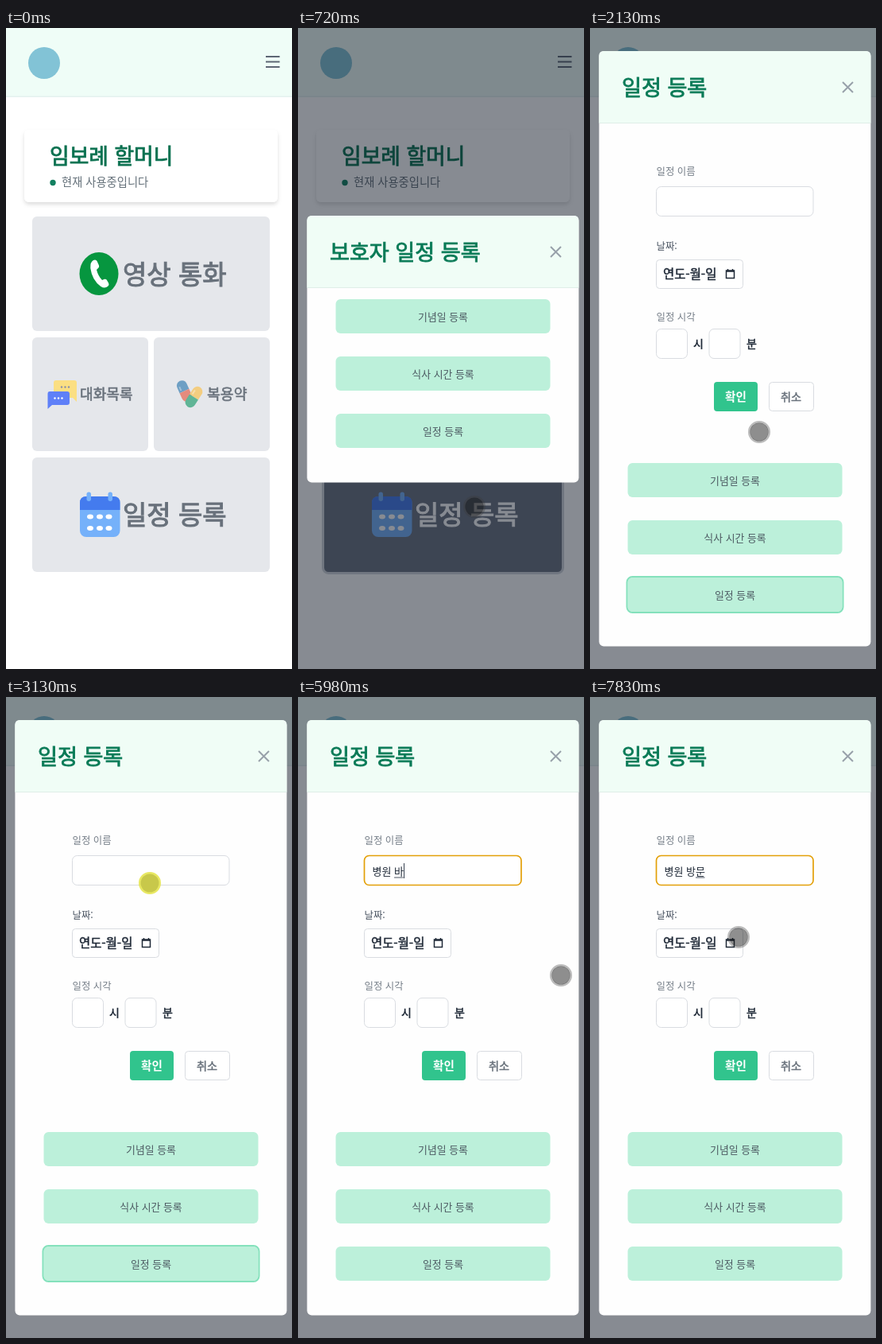
An HTML page that plays this animation: 360 px wide and 806 px high, repeating every 8000 ms.

```html
<!DOCTYPE html>
<html lang="ko">
<head>
<meta charset="utf-8">
<title>일정 등록</title>
<style>
html, body { margin: 0; width: 100%; height: 100%; overflow: hidden; background: #fff; }
svg { display: block; width: 100vw; height: 100vh; }
text { font-family: "Noto Sans CJK KR", "Noto Sans CJK JP", "Noto Sans CJK", sans-serif; white-space: pre; }
</style>
</head>
<body>
<svg id="stage" viewBox="0 0 360 806"></svg>
<script>
const LOOP = 8000;

// x, y, right, bottom
const box = (x, y, r, b, fill, attrs = '', rx = 6) =>
  `<rect x="${x}" y="${y}" width="${r - x}" height="${b - y}" rx="${rx}" fill="${fill}" ${attrs}/>`;
// cy is the middle of the glyphs
const label = (str, x, cy, size, fill, attrs = '') =>
  `<text x="${x}" y="${cy + size * 0.37}" font-size="${size}" fill="${fill}" ${attrs}>${str}</text>`;
// a thin outline gives a weight between regular and bold
const heading = (str, x, cy, size, fill, attrs = '') =>
  label(str, x, cy, size, fill, `stroke="${fill}" stroke-width="${size * 0.032}" ${attrs}`);
const CENTER = 'text-anchor="middle"';
const path = (d, stroke, width) =>
  `<path d="${d}" fill="none" stroke="${stroke}" stroke-width="${width}"/>`;
const dots = (xs, y, rx, ry, fill = '#fff') =>
  xs.map(x => `<ellipse cx="${x}" cy="${y}" rx="${rx}" ry="${ry}" fill="${fill}"/>`).join('');
const field = (x, y, r, b, rx = 6, attrs = '') =>
  box(x + .5, y + .5, r - .5, b - .5, '#fff', `stroke="#d9dce1" ${attrs}`, rx);
const tile = (x, y, r, b) => box(x, y, r, b, '#e5e7eb');

const phone = `<ellipse cx="117" cy="309" rx="24.5" ry="27" fill="#06963f"/>
  <path d="M110 292 q3 -1.5 4.5 1 l2.5 5.5 q.7 2 -1 3.5 l-2 2 q2 8 7 13 l3 -1.2 q1.7 -.5 2.8 1 l2.3 4 q1.2 2.3 -.8 4 q-4 3.5 -9 .2 q-11 -8 -13 -23 q-.4 -8 3.7 -10z" fill="#fff"/>`;
const chat = `<path d="M63 443 H86 q3 0 3 3 V470 l-5 -5 H63 q-3 0 -3 -3 V446 q0 -3 3 -3z" fill="#fbdf82"/>
  ${dots([70, 74.5, 79], 451.5, 1.2, 1.2, '#8a8fa8')}
  <path d="M55 457 H77 q3 0 3 3 V471 q0 3 -3 3 H58 l-5.5 5 V460 q0 -3 2.5 -3z" fill="#5f80f8"/>
  ${dots([61.5, 66, 70.5], 465.5, 1.2, 1.2)}`;
const pill = (x, y, angle, half, top, bottom) =>
  `<g transform="translate(${x} ${y}) rotate(${angle})">
    <path d="M-6.5 0 V${6.5 - half} a6.5 6.5 0 0 1 13 0 V0z" fill="${top}"/>
    <path d="M-6.5 0 V${half - 6.5} a6.5 6.5 0 0 0 13 0 V0z" fill="${bottom}"/>
    <path d="M-3.5 ${6.5 - half} V-2" stroke="#fff" stroke-opacity=".35" stroke-width="2"/></g>`;
const calendar = box(93, 589, 143.5, 640, '#75b1fa', '', 8) +
  '<path d="M93 606 V597 q0 -8 8 -8 H135.5 q8 0 8 8 V606z" fill="#447bee"/>' +
  box(101.5, 583.5, 107, 595, '#75b1fa', '', 2.7) + box(128.5, 583.5, 134, 595, '#75b1fa', '', 2.7) +
  dots([106, 118, 129.5], 614.5, 4, 3) + dots([106, 118, 129.5], 629, 4, 3);

const GRAY = '#68717b', GREEN = '#08704f', INK = '#1f2937';

const home = box(0, 0, 360, 86, '#effdf7', '', 0) + box(0, 85.5, 360, 87, '#e4f1ef', '', 0) +
  '<circle cx="48" cy="44" r="20" fill="#82c3d6"/>' +
  path('M327 36 H344.5 M327 42.5 H344.5 M327 49 H344.5', '#5d6674', 2) +
  box(23, 128, 342, 219, '#fff', 'filter="url(#shadow)"') +
  heading('임보례 할머니', 55, 161, 26.8, GREEN) +
  '<circle cx="59" cy="194.5" r="3.7" fill="#128060"/>' +
  label('현재 사용중입니다', 70, 194, 14.3, '#65717a') +
  tile(33, 237, 332, 381) + phone + heading('영상 통화', 147, 310, 33, GRAY) +
  tile(33, 389, 179, 532) + chat + heading('대화목록', 93, 460, 18.1, GRAY) +
  tile(186, 389, 332, 532) + pill(224.5, 456.5, -24, 14, '#6d9fc4', '#e48b7d') +
  pill(236.5, 464, 33, 14.5, '#f3cd80', '#60b596') + heading('복용약', 253, 460, 18.3, GRAY) +
  tile(33, 540, 332, 684) +
  `<g id="pressed">${box(31.5, 538.5, 333.5, 685.5, '#6b7280', 'stroke="#d1d5db" stroke-width="3"', 7)}</g>` +
  calendar + `<g id="plan">${heading('일정 등록', 147, 612, 33, 'currentColor')}</g>`;

const LEFT = 11.4, RIGHT = 353.4;
const panel = (top, bottom, title) =>
  box(LEFT, top, RIGHT, bottom, '#fefefe') +
  `<path d="M${LEFT} ${top + 90} V${top + 6} q0 -6 6 -6 H${RIGHT - 6} q6 0 6 6 V${top + 90}z" fill="#f0fdf6"/>` +
  box(LEFT, top + 90, RIGHT, top + 91, '#dfeee8', '', 0) +
  heading(title, 40, top + 46, 27.1, '#087a56') +
  path(`M318 ${top + 39} l13 13 m0 -13 l-13 13`, '#98a1aa', 2);
const choices = top => ['기념일 등록', '식사 시간 등록', '일정 등록'].map((name, i) => {
  const y = top + 72 * i;
  return box(47.5, y, 317.5, y + 43, '#bcf0da') + label(name, 182.5, y + 22, 12.9, '#4c5a62', CENTER);
}).join('');

const menu = panel(236, 571.6, '보호자 일정 등록') + choices(341);

const form = panel(29, 777.6, '일정 등록') +
  label('일정 이름', 83.5, 180, 12.4, '#747d87') + field(83, 199, 281.5, 237, 6, 'id="name"') +
  `<text id="typed" x="93.5" y="223.5" font-size="13" fill="${INK}"></text>` +
  '<rect id="under" y="226.5" height="1" width="11.5" fill="#4b5563"/>' +
  '<rect id="caret" y="209" height="19" width="1" fill="#374151"/>' +
  label('날짜:', 83.5, 274, 12.4, '#4b5563') + field(83, 291, 193, 328, 4) +
  heading('연도-월-일', 92, 309.5, 15.4, INK) +
  path('M171.5 305 V314.5 H181.5 V305z M171 306 H182 M173.5 303 V305 M179.5 303 V305', INK, 1.5) +
  label('일정 시각', 83.5, 363, 12.4, '#747d87') +
  field(83, 378, 123, 416) + heading('시', 130, 397, 14, INK) +
  field(149.5, 378, 189.5, 416) + heading('분', 197, 397, 14, INK) +
  box(156, 445, 211, 482, '#31c48d', '', 4) +
  label('확인', 183.5, 463.5, 14.6, '#fff', `font-weight="700" ${CENTER}`) +
  field(225, 445, 282, 482, 4) + heading('취소', 253, 463.5, 14.2, GRAY, CENTER) +
  choices(547) +
  `<g id="ring">${box(46.5, 690, 318.5, 735, 'none', 'stroke="#84e1bc" stroke-width="2"', 7)}</g>`;

const stage = document.getElementById('stage');
stage.innerHTML = `<defs><filter id="shadow" x="-10%" y="-10%" width="120%" height="130%">
    <feDropShadow dx="0" dy="3" stdDeviation="2.5" flood-opacity=".13"/></filter></defs>
  ${home}
  <rect id="shade" width="360" height="806" fill="#111827" opacity=".5"/>
  <g id="menu">${menu}</g><g id="form">${form}</g>
  <g id="touch"><circle r="12.5" fill="none" stroke-width="3"/><circle r="11.5"/></g>`;

const el = id => document.getElementById(id);
const show = (id, on) => el(id).setAttribute('visibility', on ? 'visible' : 'hidden');
const within = (t, spans) => spans.some(([a, b]) => t >= a && t < b);

// time, x, y
const touchPath = [
  [130, 374, 760], [190, 345, 745], [390, 222, 602], [1330, 222, 602], [1500, 226, 585],
  [1790, 213, 508], [2400, 213, 508], [2550, 218, 440], [2930, 181, 234], [3200, 181, 234],
  [3460, 295, 312], [3600, 295, 312], [3790, 331, 350], [6770, 331, 350], [7100, 167, 317],
  [7240, 85, 316], [7500, 146, 314], [7640, 146, 314], [7830, 187, 302]
];
const keys = [
  [0, ''], [4650, 'ㅂ'], [4790, '벼'], [4920, '병'], [5250, '병ㅇ'], [5310, '병우'], [5510, '병워'],
  [5640, '병원'], [5710, '병원 '], [5840, '병원 ㅂ'], [5980, '병원 바'], [6180, '병원 방'],
  [6240, '병원 방ㅁ'], [6310, '병원 방무'], [6370, '병원 방문']
];
const taps = [[660, 720], [1990, 2060], [3130, 3190]];
const caretOff = [[0, 3190], [3730, 4250], [6830, 7300], [7830, LOOP]];

function touchAt(t) {
  const i = touchPath.findIndex(p => p[0] > t);
  if (i < 0) return touchPath.at(-1).slice(1);
  if (i === 0) return touchPath[0].slice(1);
  const [a, b] = [touchPath[i - 1], touchPath[i]];
  const k = (t - a[0]) / (b[0] - a[0]);
  return [a[1] + (b[1] - a[1]) * k, a[2] + (b[2] - a[2]) * k];
}

function draw(t) {
  const inForm = t >= 2130, focused = t >= 3190;
  show('pressed', t >= 660);
  el('plan').style.color = t >= 660 ? '#fff' : GRAY;
  show('shade', t >= 720);
  show('menu', t >= 720 && !inForm);
  show('form', inForm);
  show('ring', inForm && !focused);

  el('name').setAttribute('stroke', focused ? '#e3a008' : '#d9dce1');
  el('name').setAttribute('stroke-width', focused ? 1.7 : 1);
  const text = keys.findLast(k => k[0] <= t)[1];
  const typed = el('typed');
  typed.textContent = text;
  const end = 93.5 + (text ? typed.getComputedTextLength() : 0);
  el('caret').setAttribute('x', end);
  el('under').setAttribute('x', end - 12);
  show('caret', inForm && !within(t, caretOff));
  show('under', text && !text.endsWith(' '));

  const tapping = within(t, taps);
  const [rim, core] = el('touch').children;
  el('touch').setAttribute('transform', `translate(${touchAt(t)})`);
  show('touch', t >= 190);
  rim.setAttribute('stroke', tapping ? 'rgba(228,228,70,.85)' : 'rgba(60,60,60,.34)');
  core.setAttribute('fill', tapping ? '#c8c84a' : 'rgba(20,20,20,.48)');
}

const start = performance.now();
function tick() {
  draw((performance.now() - start) % LOOP);
  requestAnimationFrame(tick);
}
tick();
</script>
</body>
</html>
```
